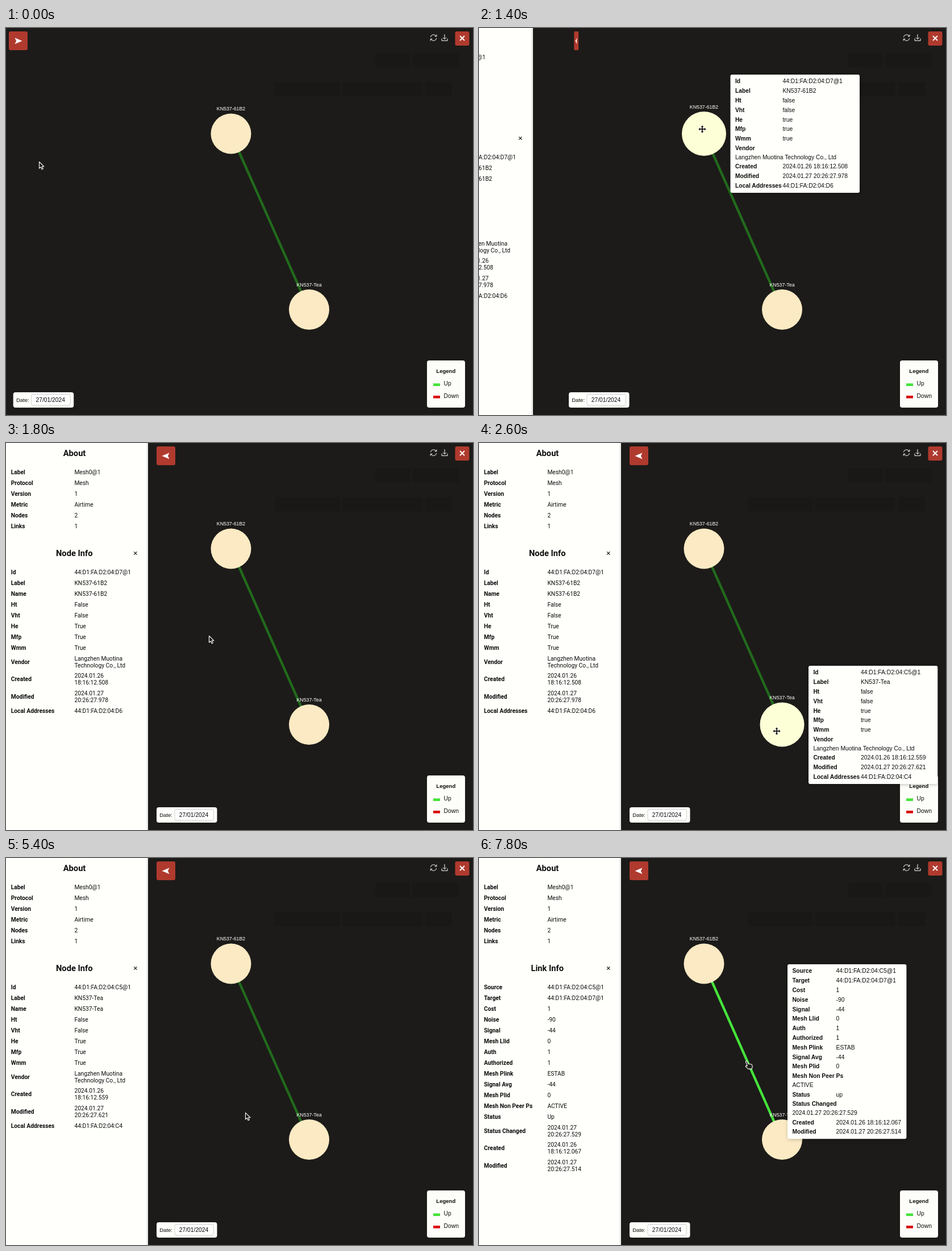
An HTML page that plays this animation: 822 by 681 pixels, repeating every 8000 ms.

```html
<!DOCTYPE html>
<html lang="en">
<head>
<meta charset="utf-8">
<title>Mesh topology</title>
<style>
html, body { margin: 0; width: 100%; height: 100%; overflow: hidden; background: #1c1b19; }
svg { display: block; width: 100vw; height: 100vh; }
text { font: 10.29px "Liberation Sans", Arial, sans-serif; fill: #0c0c0c; white-space: pre; }
.side text { font-family: Roboto, sans-serif; }
.side .title { font-size: 14.7px; font-weight: 700; text-anchor: middle; }
text.b { font-weight: 700; }
text.small { font-size: 9.56px; }
text.node { font-size: 8.82px; fill: #fff; text-anchor: middle; }
.tip { filter: drop-shadow(1px 1.5px 3px rgba(0,0,0,.25)); }
</style>
</head>
<body>
<svg id="stage" viewBox="0 0 822 681"></svg>
<script>
const LOOP = 8000, STEP = 200;
const PAPER = '#fffffc', DARK = '#1c1b19', RED = '#b03a2e';
const CREAM = '#fbeac4', GLOW = '#fdffd6', UP = '#45e33a', UP_DIM = '#226a1c';
const stage = document.getElementById('stage');

function el(parent, tag, attrs = {}, content) {
  const e = document.createElementNS('http://www.w3.org/2000/svg', tag);
  set(e, attrs);
  if (content !== undefined) e.textContent = content;
  parent.appendChild(e);
  return e;
}
function set(e, attrs) {
  for (const k in attrs) e.setAttribute(k, attrs[k]);
}
const group = (parent, attrs) => el(parent, 'g', attrs);
const box = (parent, x, y, width, height, fill, rx = 0) =>
  el(parent, 'rect', { x, y, width, height, fill, rx });
const label = (parent, x, y, content, cls = '') =>
  el(parent, 'text', { x, y, class: cls }, content);
const stroke = (parent, d, color, width) =>
  el(parent, 'path', { d, fill: 'none', stroke: color, 'stroke-width': width });
const show = (e, on) => e.setAttribute('display', on ? 'inline' : 'none');
const move = (e, x, y) => e.setAttribute('transform', `translate(${x} ${y})`);

// Data
const VENDOR = 'Langzhen Muotina Technology Co., Ltd';
const nodeRows = (id, name, created, modified, local) => [
  ['Id', id], ['Label', name], ['Ht', 'false'], ['Vht', 'false'], ['He', 'true'],
  ['Mfp', 'true'], ['Wmm', 'true'], ['Vendor', VENDOR, true],
  ['Created', '2024.01.26 ' + created], ['Modified', '2024.01.27 ' + modified],
  ['Local Addresses', local]
];
const NAMES = ['KN537-61B2', 'KN537-Tea'];
const MAC = '44:D1:FA:D2:04:';
const DATA = [
  nodeRows(MAC + 'D7@1', NAMES[0], '18:16:12.508', '20:26:27.978', MAC + 'D6'),
  nodeRows(MAC + 'C5@1', NAMES[1], '18:16:12.559', '20:26:27.621', MAC + 'C4'),
  [
    ['Source', MAC + 'C5@1'], ['Target', MAC + 'D7@1'], ['Cost', '1'], ['Noise', '-90'],
    ['Signal', '-44'], ['Mesh Llid', '0'], ['Auth', '1'], ['Authorized', '1'],
    ['Mesh Plink', 'ESTAB'], ['Signal Avg', '-44'], ['Mesh Plid', '0'],
    ['Mesh Non Peer Ps', 'ACTIVE', true], ['Status', 'up'],
    ['Status Changed', '2024.01.27 20:26:27.529', true],
    ['Created', '2024.01.26 18:16:12.067'], ['Modified', '2024.01.27 20:26:27.514']
  ]
];

// Dimmed page behind the overlay
box(stage, 0, 0, 822, 681, DARK);
for (const [x, y, w] of [[650, 44, 61], [715, 44, 82], [473, 95, 115], [592, 95, 141], [738, 95, 47]])
  box(stage, x, y, w, 25, '#191816', 2);

// Graph
const link = el(stage, 'line', { x1: 396, y1: 186, x2: 533.5, y2: 495.5, 'stroke-width': 4.4 });
const nodes = [[396, 186], [533.5, 495.5]].map(([x, y], i) => {
  const dot = el(stage, 'circle', { cx: x, cy: y });
  const name = label(stage, x, 0, NAMES[i], 'node');
  return on => {
    const r = on ? 39 : 35.5;
    set(dot, { r, fill: on ? GLOW : CREAM });
    set(name, { y: y - r - 5.3 });
  };
});

// Top right controls
stroke(stage, 'M747.3 16.2A5.3 5.3 0 0 1 757 14.2M757.8 17.8A5.3 5.3 0 0 1 748 19.8', '#fff', 1);
stroke(stage, 'M757.9 11.5V14.7H754.7M747.2 22.5V19.3H750.4', '#fff', 1);
stroke(stage, 'M772 11V19.5M769 16.7L772 19.7L775 16.7M767 18.5V22.3H777V18.5', '#fff', 1);
box(stage, 790.5, 6, 25, 25, RED, 3);
stroke(stage, 'M799 14L807 22M807 14L799 22', '#fff', 1.9);

// Legend
const legend = group(stage);
box(legend, 741, 585, 67, 83, '#fdfdfa', 4);
label(legend, 757.3, 607.4, 'Legend', 'b small');
[['Up', UP], ['Down', '#d90d0d']].forEach(([name, color], i) => {
  box(legend, 752, 625.4 + i * 21.6, 12, 4.6, color);
  label(legend, 770.6, 629.2 + i * 21.4, name);
});

// Side panel
const side = group(stage, { class: 'side' });
box(side, 0, 0, 247, 681, PAPER);
box(side, 247, 0, 3, 681, '#eceeec');

function sideRows(parent, y, rows) {
  for (const [key, value] of rows) {
    const cut = value === VENDOR ? value.indexOf(' Tech') : value.indexOf(' ');
    const lines = cut < 0 ? [value] : [value.slice(0, cut), value.slice(cut + 1)];
    const half = lines.length > 1 ? 15.4 : 9.5;
    y += half;
    label(parent, 8.7, y + 3.7, key, 'b');
    lines.forEach((s, i) =>
      label(parent, 120.4, y + 3.7 + (i - (lines.length - 1) / 2) * 11.9, s));
    y += half;
  }
}
label(side, 120.5, 23.4, 'About', 'title');
sideRows(side, 41.5, [['Label', 'Mesh0@1'], ['Protocol', 'Mesh'], ['Version', '1'],
  ['Metric', 'Airtime'], ['Nodes', '2'], ['Links', '1']]);
stroke(side, 'M225.2 191.4L230.4 196.6M230.4 191.4L225.2 196.6', '#111', 1.2);

const capital = s => /^[a-z]/.test(s) ? s[0].toUpperCase() + s.slice(1) : s;
const infos = DATA.map((rows, i) => {
  const g = group(side);
  const list = rows.map(([k, v]) => [k, capital(v)]);
  if (i < 2) list.splice(2, 0, ['Name', NAMES[i]]);
  label(g, 120.3, 199.3, i < 2 ? 'Node Info' : 'Link Info', 'title');
  sideRows(g, 217.5, list);
  return g;
});

// Date picker and panel toggle
const date = group(stage);
box(date, 0, 641, 106.5, 27, PAPER, 4);
set(box(date, 32, 644.5, 68.5, 19.5, '#fff', 3), { stroke: '#cfcfcb', 'stroke-width': 1 });
label(date, 5.2, 657.8, 'Date:', 'small');
label(date, 39.8, 657.9, '27/01/2024');

const toggle = group(stage);
box(toggle, -16.5, -16.5, 33, 33, RED, 3);
el(toggle, 'path', { d: 'M-6 -5.3L7 .2L-6 5.7L-3.4 .2Z', fill: '#fff' });

// Tooltips
const tips = [[442.5, 82, 227.5, 208, 92], [580, 392, 227.3, 208, 92], [543, 187, 209.4, 307.3, 85.6]]
  .map(([x, y, w, h, column], i) => {
    const g = group(stage, { class: 'tip' });
    box(g, x, y, w, h, PAPER, 3);
    let line = y + 15.4;
    for (const [key, value, below] of DATA[i]) {
      label(g, x + 8.4, line, key, 'b');
      if (below) line += 15.5;
      label(g, x + (below ? 8.4 : column), line, value);
      line += 16.8;
    }
    return g;
  });

// Pointers
const cursors = {
  arrow: 'M.5 .5V12L3.2 9.6L5.2 13.8L7.3 12.8L5.3 8.8H9Z',
  move: 'M0 -7L3 -3.6H1.2V-1.2H3.6V-3L7 0L3.6 3V1.2H1.2V3.6H3L0 7L-3 3.6H-1.2V1.2H-3.6V3L-7 0L-3.6 -3V-1.2H-1.2V-3.6H-3Z',
  hand: 'M-2.6 .8Q-1.2 -1.6 .2 .6L2 5L6.5 5.2Q9 5.8 9 8V11L8 13.6H1.8L-2.6 9.6Q-3 7.8 -1 8.2L.2 8.8Z'
};
for (const kind in cursors)
  cursors[kind] = el(stage, 'path', {
    d: cursors[kind],
    fill: kind === 'move' ? '#111' : DARK,
    stroke: '#fff',
    'stroke-width': kind === 'move' ? .7 : 1.1,
    'stroke-linejoin': 'round'
  });

// Motion: [time, ...values]
const PATH = [[0, 58, 235], [200, 78, 236], [1000, 393, 178], [1400, 393, 178], [1800, 357, 339],
  [2600, 524, 507], [4000, 524, 507], [4400, 508, 529], [5200, 404, 478], [6000, 472, 357.5]];
const PANEL = [[1200, 0, 0], [1400, .38, .576], [1600, .9, .95], [1800, 1, 1]];

function at(keys, t) {
  const n = keys.findIndex(k => k[0] > t);
  if (n < 0) return keys[keys.length - 1].slice(1);
  if (n === 0) return keys[0].slice(1);
  const a = keys[n - 1], b = keys[n], f = (t - a[0]) / (b[0] - a[0]);
  return a.slice(1).map((v, i) => v + (b[i + 1] - v) * f);
}

function draw(t) {
  const within = (a, b) => t >= a && t < b;
  const hover = within(1000, 1600) ? 0 : within(2600, 4400) ? 1 : t >= 6000 ? 2 : -1;
  const tip = within(1000, 1800) ? 0 : within(2600, 4600) ? 1 : t >= 6000 ? 2 : -1;
  const info = t < 3800 ? 0 : t < 7800 ? 1 : 2;
  nodes.forEach((paint, i) => paint(hover === i));
  set(link, { stroke: hover === 2 ? UP : UP_DIM });
  tips.forEach((g, i) => show(g, tip === i));
  infos.forEach((g, i) => show(g, info === i));

  const [open, turn] = at(PANEL, t);
  move(side, -250 * (1 - open), 0);
  move(date, 12.7 + 252.3 * turn, 0);
  set(toggle, { transform: `translate(${21.5 + 260 * turn} 22.5) scale(${Math.cos(Math.PI * turn)} 1)` });

  const [x, y] = at(PATH, t);
  const kind = hover < 0 ? 'arrow' : hover < 2 ? 'move' : 'hand';
  for (const k in cursors) show(cursors[k], k === kind);
  move(cursors[kind], x, y);
}

const start = performance.now();
function tick() {
  const t = (performance.now() - start) % LOOP;
  draw(Math.floor(t / STEP) * STEP);
  requestAnimationFrame(tick);
}
tick();
</script>
</body>
</html>
```
